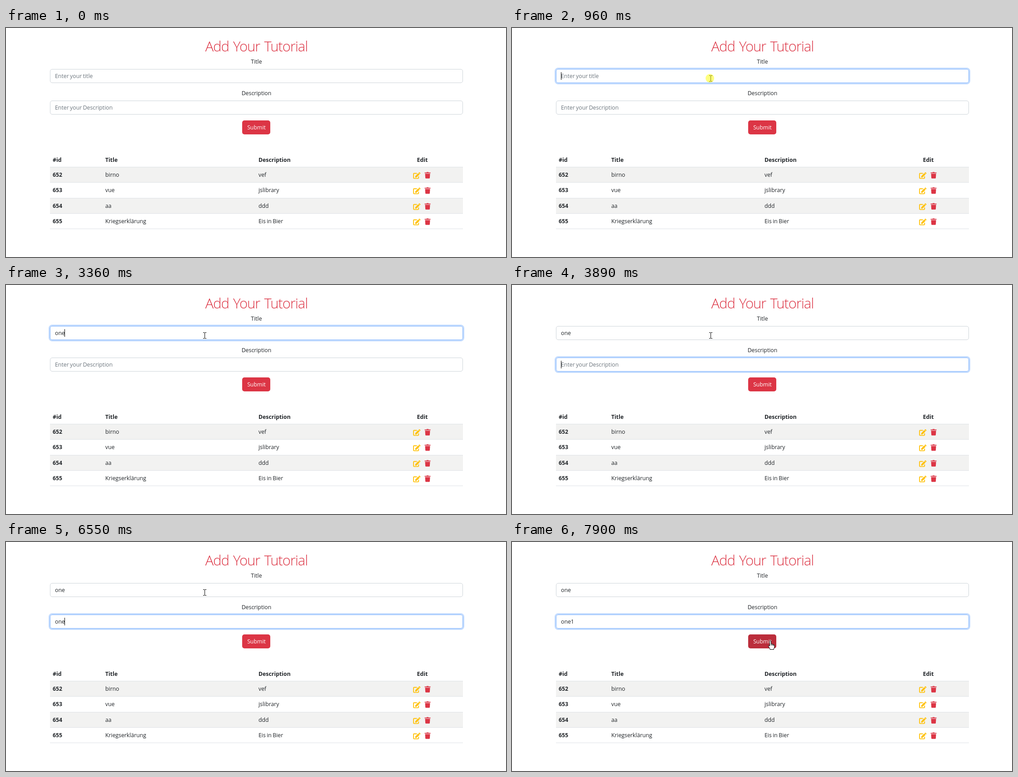
Recreate the animation shown at these times as an HTML page. Size 1103 by 508 pixels, loop 8000 ms.

```html
<!DOCTYPE html>
<html lang="en">
<head>
<meta charset="utf-8">
<title>Add Your Tutorial</title>
<style>
html, body { margin: 0; width: 100%; height: 100%; overflow: hidden; background: #fff; }
svg { display: block; font: 12.3px "Open Sans", "Noto Sans", sans-serif; word-spacing: -.8px; fill: #212529; }
.bold { font-weight: 700; }
.mid { text-anchor: middle; }
h1, .head { font-size: 31px; font-weight: 300; letter-spacing: -1px; word-spacing: 2px; fill: #dc3545; }
.ring { fill: none; stroke: #c2dbfe; stroke-width: 3; }
.hint { fill: #6c757d; }
.cursor { fill: #fff; stroke: #000; stroke-linejoin: round; }
</style>
</head>
<body>
<svg id="stage" width="1103" height="508" viewBox="0 0 1103 508"></svg>
<script>
const LOOP = 8000;
const stage = document.getElementById('stage');
const $ = id => document.getElementById(id);
const text = (x, y, s, cls = '') => `<text x="${x}" y="${y}" class="${cls}">${s}</text>`;
const rule = y => `<path d="M97 ${y + .5}H1008" stroke="#dee2e6"/>`;

const field = (id, y) => `
  <rect id="${id}Ring" class="ring" x="95.5" y="${y - 1.5}" width="914" height="34" rx="6.5"/>
  <rect id="${id}Box" x="97.5" y="${y + .5}" width="910" height="30" rx="4.5" fill="#fff"/>
  <text id="${id}Text" x="108" y="${y + 20}"></text>
  <path id="${id}Caret" d="M.5 ${y + 7}v17" stroke="#000"/>`;

const icons = y => `
  <g transform="translate(898 ${y})" fill="#ffc107">
    <path d="M8.5 3H2.2Q1 3 1 4.2V13Q1 14.2 2.2 14.2H11Q12.2 14.2 12.2 13V9.5" fill="none" stroke="#ffc107" stroke-width="1.8"/>
    <path d="M4.9 8.9L11.5 2.3L14.4 5.2L7.8 11.8L4.5 12.2Z"/>
    <path d="M13 .8Q13.8 0 14.6 .8L15.9 2.1Q16.7 2.9 15.9 3.7L15 4.6L12.1 1.7Z"/>
  </g>
  <path transform="translate(923.5 ${y})" fill="#dc3545"
    d="M0 1H4L4.6 0H8.4L9 1H13V2.8H0ZM1 3.7H12L11.4 13Q11.3 14.3 10 14.3H3Q1.7 14.3 1.6 13Z"/>`;

const rows = [
  [652, 'birno', 'vef'],
  [653, 'vue', 'jslibrary'],
  [654, 'aa', 'ddd'],
  [655, 'Kriegserklärung', 'Eis in Bier']
].map(([id, title, desc], i) => {
  const top = Math.round(308 + 34.3 * i);
  const stripe = i % 2 ? '' : `<rect x="97" y="${top}" width="911" height="34" fill="#f2f2f1"/>`;
  return stripe + rule(top) + text(103, top + 22, id, 'bold') +
    text(219, top + 22, title) + text(557, top + 22, desc) + icons(top + 11.5);
});

stage.innerHTML =
  text(552.5, 52, 'Add Your Tutorial', 'head mid') +
  text(552.5, 79, 'Title', 'mid') + field('title', 91) +
  text(552.5, 149, 'Description', 'mid') + field('desc', 161) +
  '<rect id="button" x="521" y="205" width="62" height="31" rx="5"/>' +
  '<text x="552.5" y="225" class="mid" style="fill:#fff">Submit</text>' +
  text(103, 297, '#id', 'bold') + text(219, 297, 'Title', 'bold') +
  text(557, 297, 'Description', 'bold') + text(918.5, 297, 'Edit', 'bold mid') +
  rows.join('') + rule(445) + `
  <g id="pointer" class="cursor">
    <path id="beam" d="M-3 -6.5H0M1 -6.5H4M.5 -6V6M-3 6.5H0M1 6.5H4"/>
    <path id="arrow" d="M0 0V16L3.7 12.5L6.3 18.3L8.6 17.3L6.1 11.6H11.3Z"/>
    <path id="hand" d="M-1.5 1.5Q-1.5 0 0 0T1.5 1.5V7Q4 6.3 4.2 8Q6.3 7.5 6.8 9Q9 8.8 9 11V14Q9 16 7.5 17.5V19.5H-1V18L-4.2 12.5Q-4.7 10.5 -3 10.5L-1.5 12ZM1.5 7V10.5M4.2 8V11M6.8 9V11.5"/>
  </g>
  <circle id="click" cx="436.5" cy="111.5" r="9.5" fill="#ff0" opacity=".5"/>`;

const show = (id, on) => $(id).style.display = on ? '' : 'none';
const within = (t, spans) => spans.some(([a, b]) => t >= a && t < b);
const typed = (t, word, times) => word.slice(0, times.filter(at => t >= at).length);

function drawField(id, focused, value, hint, caret) {
  const label = $(id + 'Text');
  label.textContent = value || hint;
  label.setAttribute('class', value ? '' : 'hint');
  show(id + 'Ring', focused);
  $(id + 'Box').setAttribute('stroke', focused ? '#86b7fe' : '#ced4da');
  const x = 108 + (value ? Math.floor(label.getComputedTextLength()) : 0);
  $(id + 'Caret').setAttribute('transform', `translate(${x})`);
  show(id + 'Caret', caret);
}

// The mouse enters from the lower right, settles in the title, then glides to the button.
function mouseAt(t) {
  if (t < 130) return null;
  if (t < 200) return [942, 416];
  if (t < 270) return [690, 262];
  if (t < 470) return [457, 121];
  if (t < 820) {
    const k = Math.floor((t - 470) / 70) / 5;
    return [449 - 11 * k, 123 - 11 * k];
  }
  const k = Math.max(0, Math.min(1, Math.floor((t - 7350) / 68.75) / 7));
  const p = k * k * (3 - 2 * k);
  return [438 + 132 * p, 112 + 107 * p];
}

function drawMouse(t) {
  const pos = mouseAt(t);
  show('pointer', pos);
  const [x, y] = (pos || [0, 0]).map(Math.round);
  const onButton = x > 520 && x < 583 && y > 204 && y < 236;
  const inField = y > 90 && y < 122 || y > 160 && y < 192;
  $('pointer').setAttribute('transform', `translate(${x} ${y})`);
  show('hand', onButton);
  show('beam', inField);
  show('arrow', !onButton && !inField);
  $('button').setAttribute('fill', onButton ? '#bb2d3b' : '#dc3545');
}

function draw(t) {
  drawField('title', t >= 960 && t < 3890,
    typed(t, 'one', [2960, 3230, 3360]), 'Enter your title',
    within(t, [[960, 1500], [2030, 2560], [2960, 3890]]));
  drawField('desc', t >= 3890,
    typed(t, 'one1', [5760, 6220, 6550, 7350]), 'Enter your Description',
    within(t, [[3890, 4440], [4970, 5500], [5760, 7080], [7350, 7880]]));
  drawMouse(t);
  show('click', t >= 960 && t < 1020);
}

const start = performance.now();
function tick() {
  draw((performance.now() - start) % LOOP);
  requestAnimationFrame(tick);
}
tick();
</script>
</body>
</html>
```
